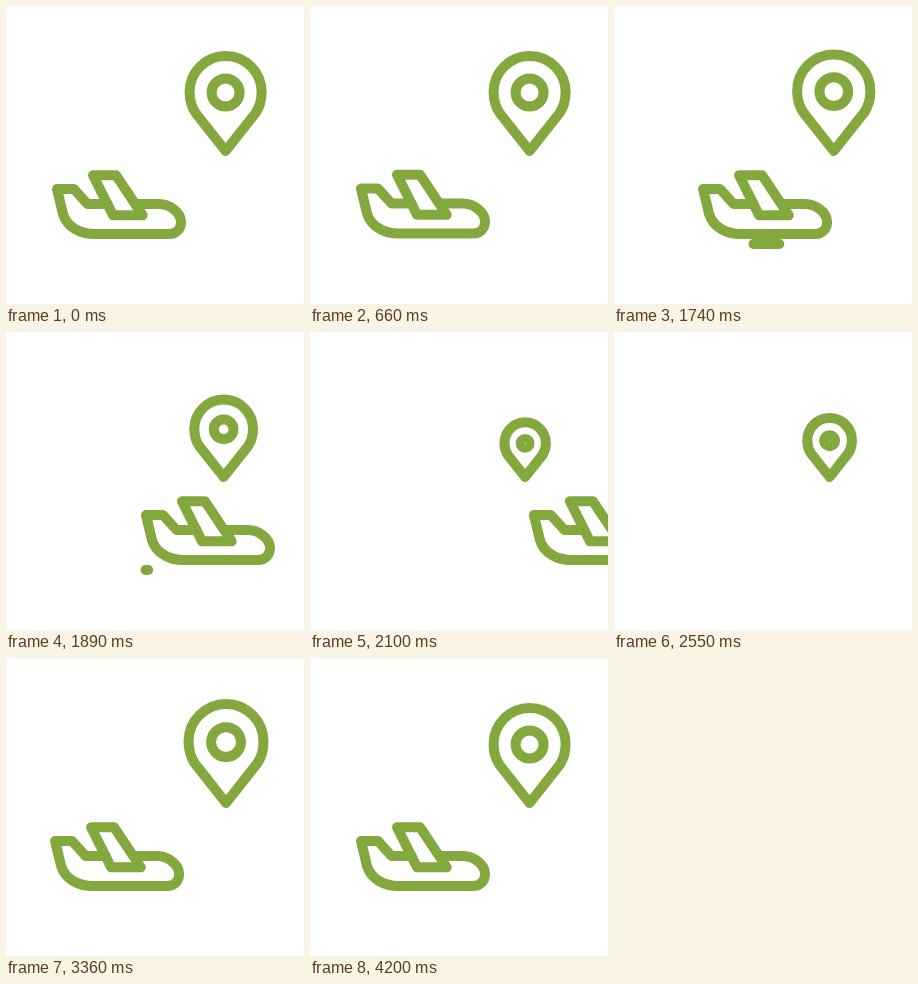
Recreate the animation shown at these times as an HTML page. Size 298 px wide and 298 px high, loop 4230 ms.

```html
<!DOCTYPE html>
<html lang="en">
<head>
<meta charset="utf-8">
<title>Plane and pin</title>
<style>
  html, body { margin: 0; width: 100%; height: 100%; overflow: hidden; background: #fff; }
  svg { display: block; width: 100%; height: 100%; }
</style>
</head>
<body>
<svg viewBox="0 0 298 298" fill="none" stroke="#82a83e" stroke-width="10" stroke-linecap="round" stroke-linejoin="round">
  <path id="pin" d="M219.6 145L189.6 107C185.6 101 183.6 94 183.6 86A36 36 0 0 1 255.6 86C255.6 94 253.6 101 249.6 107Z"/>
  <circle id="ring"/>
  <path id="trail"/>
  <g id="plane">
    <path d="M101.5 198H81.5L68 183H51L57 208C61 221 74 228 89 228H163C170 228 175 223 175 216C175 206 163 198 153 198H130"/>
    <path d="M87 169.2H110L136.7 209.3H107Z"/>
  </g>
</svg>
<script>
const LOOP = 4230;
const [pin, ring, trail, plane] = ['pin', 'ring', 'trail', 'plane'].map(id => document.getElementById(id));

const progress = (t, from, to) => Math.min(1, Math.max(0, (t - from) / (to - from)));
const smooth = u => u * u * (3 - 2 * u);
const easeOut = u => 1 - (1 - u) ** 3;

// Eased value through [time, value] stops
function track(t, stops) {
  let value = stops[0][1];
  for (let i = 1; i < stops.length; i++) {
    const [t0, v0] = stops[i - 1], [t1, v1] = stops[i];
    if (t >= t0) value = v0 + (v1 - v0) * smooth(progress(t, t0, t1));
  }
  return value;
}

const PIN_SCALE = [
  [1500, 1], [1650, 1.063], [2130, 0.57], [2550, 0.62],
  [2820, 0.62], [3290, 1.063], [3470, 1]
];

function planeShift(t) {
  return t < 2700
    ? 284.5 * smooth(progress(t, 1500, 2550))
    : -190 * (1 - easeOut(progress(t, 2820, 3510)));
}

function drawPin(t) {
  const s = track(t, PIN_SCALE);
  const anchor = { x: 209.1, y: 145 };
  pin.setAttribute('transform', `translate(${anchor.x * (1 - s)} ${anchor.y * (1 - s)}) scale(${s})`);
  pin.setAttribute('stroke-width', 10 / s);
  ring.setAttribute('cx', anchor.x + 10.5 * s);
  ring.setAttribute('cy', anchor.y - 58.5 * s);
  ring.setAttribute('r', 14 - 22.5 * (1 - s));
}

function drawTrail(t) {
  const head = 180 - 40.5 * progress(t, 1500, 1740);
  const tail = 180 - 40.5 * smooth(progress(t, 1600, 1945));
  trail.setAttribute('d', t > 1500 && t < 1945 ? `M${head} 238H${tail}` : '');
}

function draw(t) {
  // Gentle lift while the plane waits to leave
  const lift = -0.5 * Math.sin(Math.PI * progress(t, 0, 1320)) ** 2;
  plane.setAttribute('transform', `translate(${planeShift(t)} ${lift})`);
  drawPin(t);
  drawTrail(t);
}

const start = performance.now();
function tick() {
  draw((performance.now() - start) % LOOP);
  requestAnimationFrame(tick);
}
tick();
</script>
</body>
</html>
```
